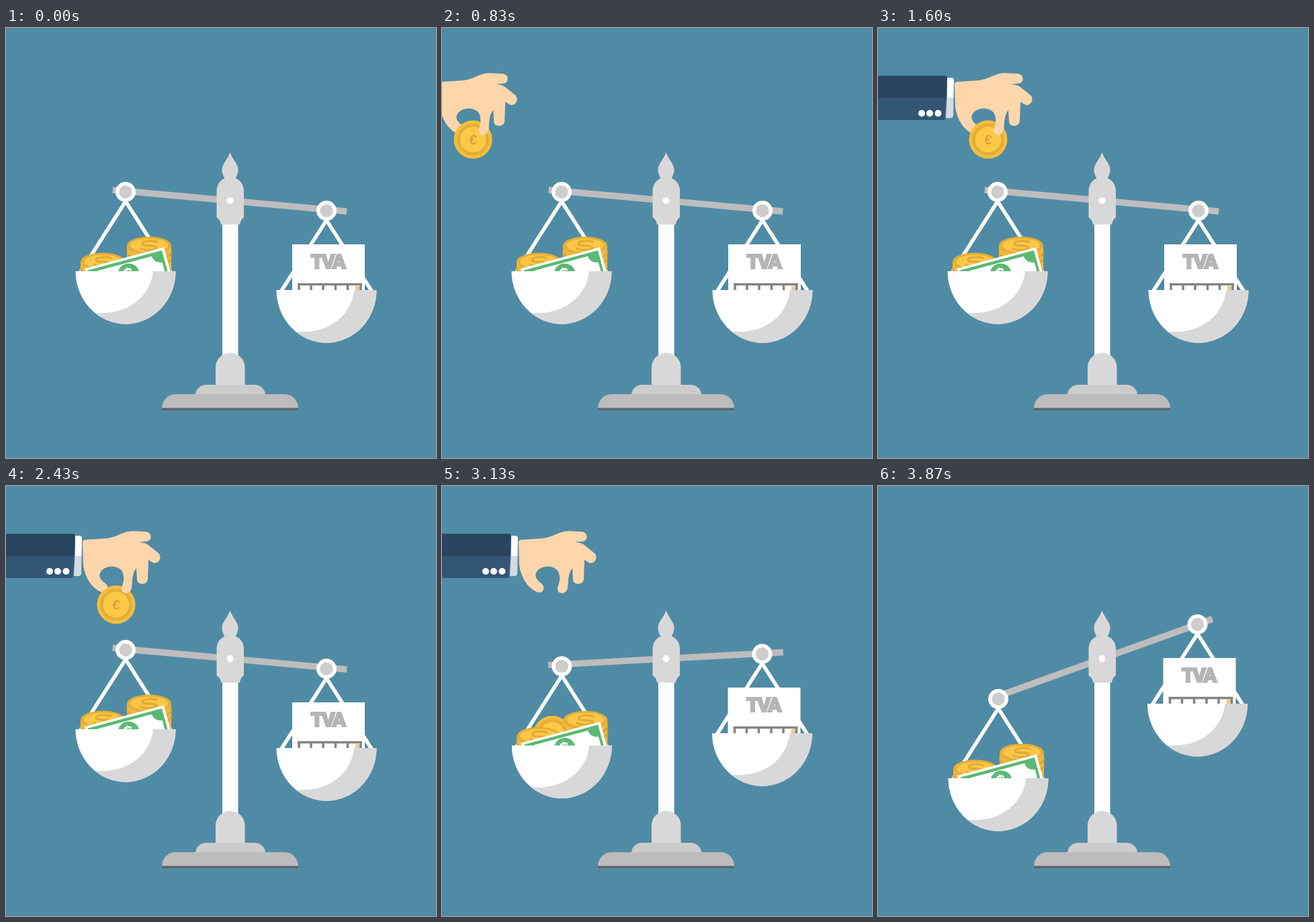
Recreate the animation shown at these times as an HTML page. Size 640 by 640 pixels, loop 4.81 s.

```html
<!DOCTYPE html>
<html lang="fr">
<head>
<meta charset="utf-8">
<title>Balance</title>
<style>
html, body { margin: 0; width: 100%; height: 100%; overflow: hidden; background: #508ba5; }
svg { display: block; width: 100vw; height: 100vh; }
.tax { font: 900 30px Roboto, "Liberation Sans", sans-serif; letter-spacing: -3px; }
.sign { font: bold 20px "Liberation Sans", sans-serif; text-anchor: middle; }
.note { font-size: 26px; }
</style>
</head>
<body>
<svg viewBox="0 0 640 640">
  <defs>
    <g id="hanger">
      <path d="M-67 119L0 14L67 119" fill="none" stroke="#fff" stroke-width="5.5"/>
      <circle r="15" fill="#fff"/>
      <circle r="9.7" fill="#cdcdcd"/>
    </g>
    <g id="bowl">
      <path d="M-74.5 118H74.5A74.5 78.5 0 0 1 -74.5 118Z" fill="#fff"/>
      <path d="M41 118H74.5A74.5 78.5 0 0 1 -46 180C10 184 38 150 41 118Z" fill="#d9d8d8"/>
    </g>
    <g id="stack">
      <path d="M-33 0V38H33V0Z" fill="#efb93b"/>
      <path d="M-33 9A33 13.5 0 0 0 33 9M-33 18A33 13.5 0 0 0 33 18" fill="none" stroke="#d9a334" stroke-width="2.5"/>
      <ellipse rx="33" ry="13.5" fill="#e6ae38"/>
      <ellipse cy="-.5" rx="28" ry="10" fill="#fcc744"/>
      <path d="M13 -5C4 -9 -12 -7 -10 -2C-8 2 10 -2 11 3C11 7 -6 8 -14 4" fill="none" stroke="#dfaa3a" stroke-width="3"/>
    </g>
  </defs>

  <rect width="640" height="640" fill="#508ba5"/>

  <rect x="322" y="288" width="23.5" height="200" fill="#fff"/>
  <path d="M312 532V505A21.75 21.5 0 0 1 355.5 505V532Z" fill="#d9d8d8"/>
  <path d="M282 546A16 15 0 0 1 298 531H370A16 15 0 0 1 386 546Z" fill="#cdcccc"/>
  <path d="M232 566A20 21 0 0 1 252 545H415A20 21 0 0 1 435 566Z" fill="#bcbcbc"/>
  <path d="M232 565.5H435V567Q435 569 432 569H235Q232 569 232 567Z" fill="#5d6468"/>

  <rect id="beam" x="-175.5" y="-4.8" width="350" height="9.6" fill="#bdbdbd"/>
  <path d="M333.5 185C337 196 345.5 202 345.5 211C345.5 217 343 221 340 226H327C324 221 321.5 217 321.5 211C321.5 202 330 196 333.5 185Z" fill="#d9d8d8"/>
  <path d="M313.5 242A20.25 20 0 0 1 354 242V282Q349 285 348 292.5H320Q319 285 313.5 282Z" fill="#d9d8d8"/>
  <circle cx="333.5" cy="257" r="5" fill="#fff"/>

  <use id="leftHanger" href="#hanger"/>

  <g id="hand">
    <path d="M-160 71H99Q103 71 103 75V104H-160Z" fill="#2a4560"/>
    <path d="M-160 104H102L100 134Q100 137 97 137H-160Z" fill="#345675"/>
    <path d="M103 74H109Q113 74 113 78L112.5 104H102.5Z" fill="#fff"/>
    <path d="M102.5 104H112.5L112 130Q112 134 108 134H101Z" fill="#d5dae1"/>
    <g fill="#fff">
      <circle cx="65" cy="127" r="5"/><circle cx="77" cy="127" r="5"/><circle cx="89.5" cy="127" r="5"/>
    </g>
    <path fill="#fdd6ab" d="M114 84Q114 80 119 80L150 78C165 76 175 67 188 67L208 68C218 69 218 82 209 82.5L194 84Q205 83 212 88L227 100C234 107 225 119 217 113L212 110L211 138C211 148 195 148 195 139L194 122Q189 128 188 138L187 151C185 163 171 161 172 152C174 145 178 138 173 127C165 116 148 119 142 126C137 132 139 139 148 145C155 151 150 161 142 158C128 152 118 138 115 118Z"/>
  </g>

  <g id="coin">
    <circle r="28.5" fill="#f5be3a"/>
    <circle r="21.5" fill="#fcc945" stroke="#e2ae3a" stroke-width="4.5"/>
    <text class="sign" y="7" fill="#d9a43a" transform="rotate(8)">€</text>
  </g>
  <path id="finger" fill="#fdd6ab" d="M194 118V122Q189 128 188 138L187 151C185 163 171 161 172 152C174 145 178 138 173 127L172 110Z"/>

  <g id="leftPan">
    <use href="#stack" x="35" y="80"/>
    <use href="#stack" x="-34" y="104"/>
    <g transform="translate(57 82.5) rotate(-15)">
      <rect x="-122" width="122" height="52" fill="#fff"/>
      <rect x="-118" y="3.5" width="114" height="45" fill="#5bb974"/>
      <path d="M-104 8H-21Q-20 19 -8 21V44H-114V20Q-104 19 -104 8Z" fill="#fff"/>
      <circle cx="-61" cy="25" r="16" fill="#5bb974"/>
      <text class="sign note" x="-61" y="33.5" fill="#fff">$</text>
    </g>
    <use href="#bowl"/>
  </g>

  <g id="rightPan">
    <use href="#hanger"/>
    <rect x="-51" y="50" width="108" height="69" fill="#fff"/>
    <text class="tax" x="-23.5" y="86" fill="#b5b5b5" stroke="#b5b5b5" stroke-width="2">TVA</text>
    <rect x="43" y="112" width="7" height="7" fill="#e9cd96"/>
    <path d="M-43 109.5H53M-41 109V119M-23 109V119M-5 109V119M13.500 109V119M31.500 109V119M51 109V119" fill="none" stroke="#848484" stroke-width="3.5"/>
    <use href="#bowl"/>
  </g>
</svg>
<script>
const LOOP = 4810;
const part = id => document.getElementById(id);
const [beam, leftHanger, leftPan, rightPan, hand, finger, coin] =
  ["beam", "leftHanger", "leftPan", "rightPan", "hand", "finger", "coin"].map(part);

const place = (el, x, y, turn = 0) =>
  el.setAttribute("transform", `translate(${x} ${y}) rotate(${turn})`);
const mix = (a, b, k) => a + (b - a) * k;

// Number of motion steps taken at time t, from 0 to count.
const steps = (t, start, interval, count) =>
  Math.max(0, Math.min(count, Math.floor((t - start) / interval) + 1));

function draw(t) {
  const enter = steps(t, 115, 39.73, 38);
  const fall = steps(t, 2425, 41.7, 21);
  const tilt = steps(t, 3090, 40, 6) / 6;
  const leave = steps(t, 3285, 37.7, 17);

  const enterX = (enter - 38) * 6.2;
  const handX = enterX - leave * 15;
  place(hand, handX, 0);
  place(finger, handX, 0);

  const leftX = mix(178, 179, tilt), leftY = mix(244, 317, tilt);
  place(leftHanger, leftX, leftY);
  place(leftPan, leftX, leftY);
  place(rightPan, mix(477, 475.5, tilt), mix(272, 206, tilt));
  place(beam, 333.5, 257, mix(5.25, -19.8, tilt));

  place(coin, 164 + enterX, 166 + fall * 10.6 + leftY - 244);
  coin.style.display = fall < 21 ? "" : "none";
}

const begin = performance.now();
function tick() {
  draw((performance.now() - begin) % LOOP);
  requestAnimationFrame(tick);
}
tick();
</script>
</body>
</html>
```
